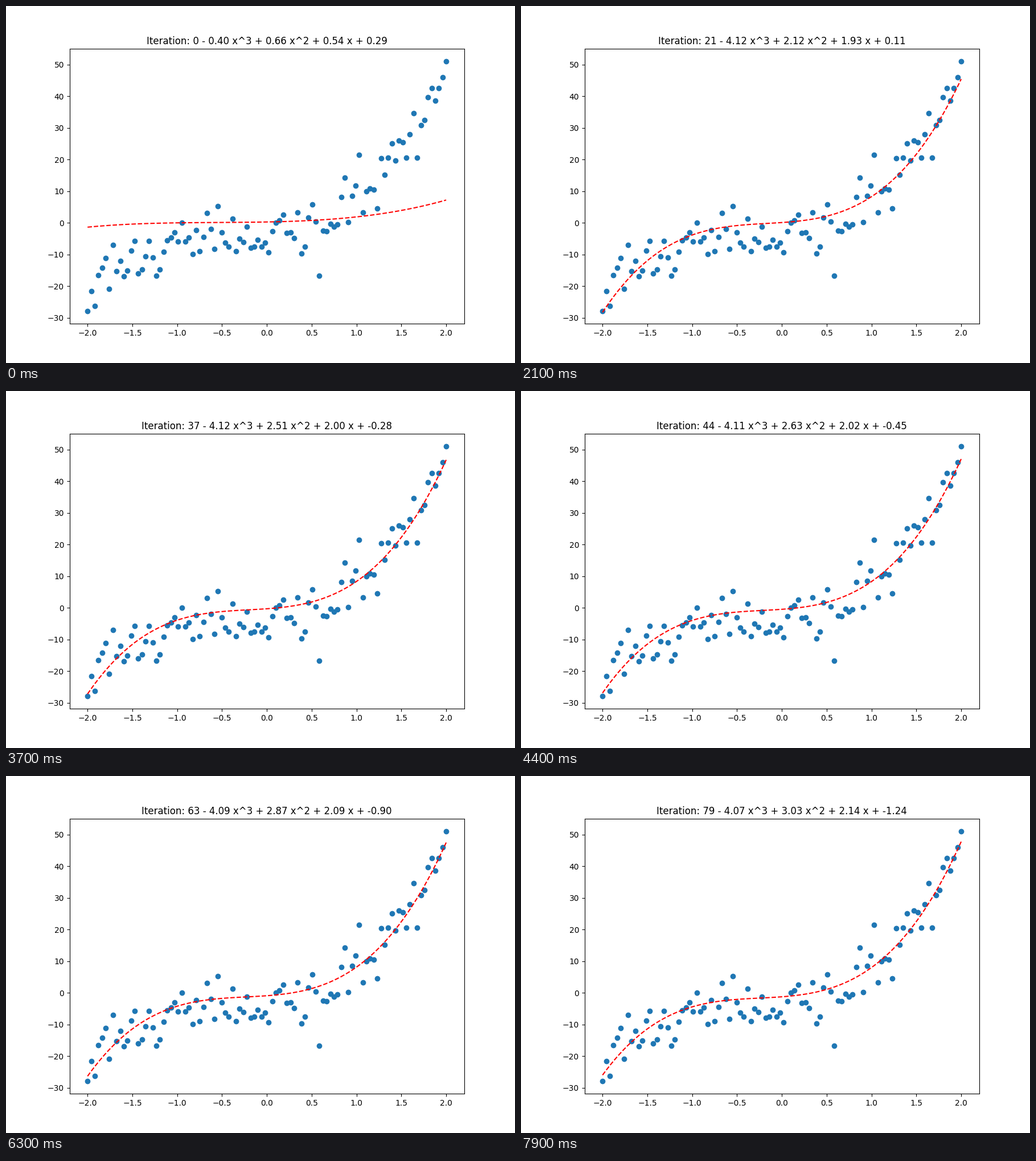
Recreate the animation shown at these times as a matplotlib script. Size 894x626 px, loop 8 s.

```python
import matplotlib.pyplot as plt
import numpy as np
from matplotlib.animation import FuncAnimation

STEPS = 80
RATE = 0.01

# Noisy samples of a cubic, evenly spaced in x
Y = np.array([
    -27.9, -21.6, -26.3, -16.5, -14.1, -11.2, -20.8, -7.0, -15.3, -12.1,
    -16.9, -15.1, -8.7, -5.7, -15.9, -14.7, -10.6, -5.7, -11.0, -16.7,
    -14.7, -9.1, -5.5, -4.7, -3.0, -5.9, 0.0, -5.9, -4.6, -9.9,
    -2.3, -8.9, -4.4, 3.2, -2.0, -8.3, 5.2, -3.1, -6.3, -7.6,
    1.3, -8.9, -5.0, -6.0, -1.2, -7.9, -7.6, -5.3, -7.6, -6.2,
    -9.4, -2.6, 0.0, 0.7, 2.5, -3.2, -3.0, -4.8, 3.3, -9.7,
    -7.6, 1.7, 5.8, 0.5, -16.7, -2.4, -2.6, -0.4, -1.2, -0.5,
    8.1, 14.3, 0.2, 8.5, 11.7, 21.4, 3.3, 9.9, 10.9, 10.5,
    4.6, 20.4, 15.1, 20.5, 25.0, 19.6, 25.9, 25.4, 20.5, 28.0,
    34.6, 20.5, 30.9, 32.5, 39.6, 42.6, 38.6, 42.5, 45.9, 51.0,
])
X = np.linspace(-2, 2, len(Y))
BASIS = np.vander(X, 4)

START = np.array([0.4002, 0.66, 0.5396, 0.287])
BEST = np.array([3.79997, 4.26039, 2.91251, -3.90237])  # least-squares cubic


def descend():
    """Weights at every step of gradient descent on the mean squared error."""
    hessian = 2 * BASIS.T @ BASIS / len(X)
    path = [START]
    for _ in range(STEPS - 1):
        w = path[-1]
        path.append(w - RATE * hessian @ (w - BEST))
    return path


PATH = descend()

fig, ax = plt.subplots(figsize=(8.94, 6.26), dpi=100)
ax.scatter(X, Y)
line, = ax.plot(X, BASIS @ START, "r--")
title = ax.set_title("")


def update(i):
    w = PATH[i]
    line.set_ydata(BASIS @ w)
    a, b, c, d = w
    title.set_text(f"Iteration: {i} - {a:.2f} x^3 + {b:.2f} x^2 + {c:.2f} x + {d:.2f}")
    return line, title


anim = FuncAnimation(fig, update, frames=STEPS, interval=100, repeat=True, repeat_delay=0)
plt.show()
```
